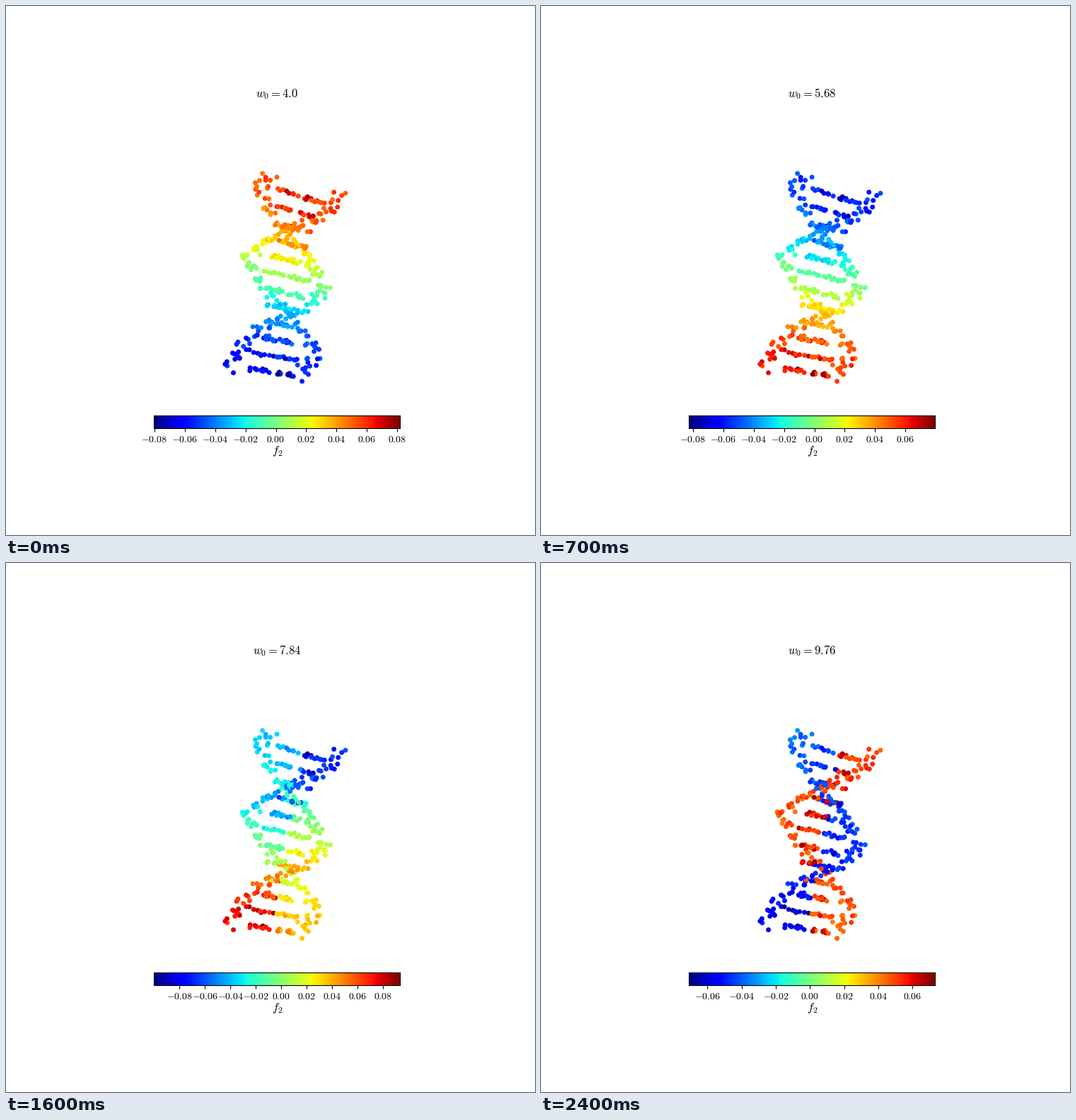
Write a matplotlib script that moves like this. It is 748 by 748 pixels and loops after 2500 ms.

```python
import matplotlib.pyplot as plt
import numpy as np
from matplotlib.animation import FuncAnimation

SIZE, DPI = 748, 100
FRAMES, INTERVAL = 25, 100
PAIRS, TURN, RADIUS = 12, 10.4, 57
CROSSING, COUPLING = 16.5, 0.4

plt.rcParams["mathtext.fontset"] = "cm"
rng = np.random.default_rng(11)


def helix(k, side, r):
    """Screen position on the strand at base pair k, r radii off the axis."""
    reach = side * r * RADIUS * np.cos(2 * np.pi * k / TURN)
    return 417 - 3.8 * k + reach, 269 + 22.6 * k + reach * (0.3 - 0.012 * k)


def base(k, side):
    """Atoms of one rung half, seen as a flat plate."""
    n = 11 if (k + (side > 0)) % 2 else 8
    x, y = helix(k, side, np.linspace(0.08, 0.58, n))
    width = 14 * np.sin(2 * np.pi * k / TURN) * rng.uniform(-1, 1, n)
    x = x + width + rng.normal(0, 1, n)
    y = y + 0.25 * width + rng.normal(0, 1.3, n)
    weight = 0.64 + 0.36 * rng.random(n) ** 2
    return np.column_stack([x, y, np.full(n, k), np.full(n, side), weight])


def backbone(k, side, n=9):
    """Atoms of the strand beside rung k, shifted towards the wide groove."""
    at = k + np.linspace(-0.48, 0.48, n)
    x, y = helix(at, side, rng.uniform(0.7, 1.14, n))
    x = x - 14 * np.sin(2 * np.pi * at / TURN) + rng.normal(0, 2, n)
    y = y - 8 + rng.normal(0, 3, n)
    weight = 0.58 + 0.2 * rng.random(n)
    return np.column_stack([x, y, at, np.full(n, side), weight])


def fit(mode, lo, hi):
    """Scale both signs of a mode to the given extremes."""
    return np.where(mode < 0, mode * lo / mode.min(), mode * hi / mode.max())


cloud = np.vstack([part(k, side) for k in range(PAIRS) for side in (-1, 1)
                   for part in (base, backbone)])
rng.shuffle(cloud)
x, y, level, side, weight = cloud.T

# One mode runs along the helix, the other separates its strands
depth = np.clip((level + 0.5) / PAIRS, 0, 1)
growth = np.where(side < 0, 0.75 + 0.25 * depth, 1)
along = fit(-weight * np.cos(np.pi * depth), -0.081, 0.081)
across = fit(side * weight * growth, -0.069, 0.071)


def field(i):
    """Lower state of the two modes as they swap at the crossing."""
    angle = 0.5 * np.arctan2(COUPLING, CROSSING - i)
    f = np.cos(angle) * along - np.sin(angle) * across
    return -f if i == 0 or i > CROSSING else f


fig = plt.figure(figsize=(SIZE / DPI, SIZE / DPI), dpi=DPI, facecolor="white")
ax = fig.add_axes([0, 0, 1, 1])
ax.set(xlim=(0, SIZE), ylim=(SIZE, 0))
ax.axis("off")
dots = ax.scatter(x, y, s=25, c=along, cmap="jet", linewidths=0)

MIDDLE = 0.5125 * SIZE
label = dict(fontsize=12, ha="center", va="baseline")
title = ax.text(MIDDLE, 129, "", **label)
ax.text(MIDDLE, 634, "$f_2$", **label)

bar = fig.add_axes([0.28, 0.20225, 0.465, 0.02325])
ramp = bar.imshow(np.arange(256)[None], cmap="jet", aspect="auto",
                  interpolation="nearest")
bar.set_yticks([])
bar.tick_params(labelsize=10)


def draw(i):
    f = field(i)
    lo, hi = f.min(), f.max()
    dots.set_array(f)
    dots.set_clim(lo, hi)
    title.set_text(f"$w_0 = {round(4 + 0.24 * i, 2)}$")
    ramp.set_extent((lo, hi, 0, 1))
    bar.set_xlim(lo, hi)
    ticks = 0.02 * np.arange(np.ceil(lo / 0.02), np.floor(hi / 0.02) + 1)
    bar.set_xticks(ticks, [f"${t + 0.0:.2f}$" for t in ticks])
    return dots, title, ramp


anim = FuncAnimation(fig, draw, frames=FRAMES, interval=INTERVAL, repeat=True)
plt.show()
```
